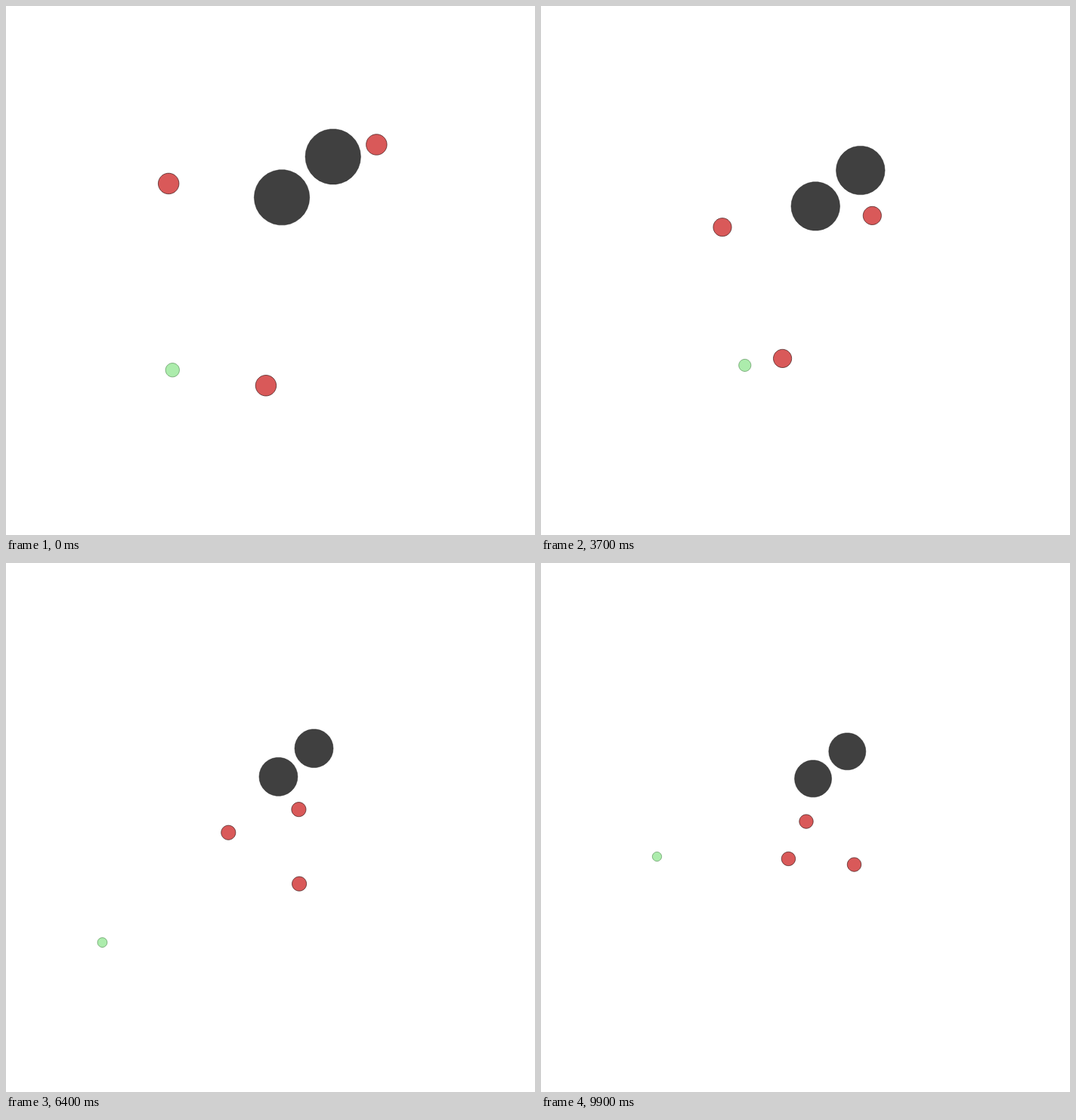
Recreate the animation shown at these times as an HTML page with a canvas. Size 700x700 px, loop 10 s.

```html
<!DOCTYPE html>
<html lang="en">
<head>
<meta charset="utf-8">
<title>Pursuit</title>
<style>
  html, body { margin: 0; width: 100%; height: 100%; overflow: hidden; background: #fff; }
  canvas { display: block; width: 700px; height: 700px; }
</style>
</head>
<body>
<canvas id="stage" width="700" height="700"></canvas>
<script>
const ctx = document.getElementById('stage').getContext('2d');
const STEP = 100, COUNT = 100, HALF = 350;

const RED = { size: 0.075, fill: '#d95959', edge: 'rgba(60,24,24,0.7)' };
const GREEN = { size: 0.05, fill: '#acecac', edge: 'rgba(44,108,44,0.5)' };
const DARK = { size: 0.2, fill: '#404040', edge: 'rgba(32,32,32,0.5)' };

// Steps at which the chasers, and the runner, change course
const CHASE = [0, 15, 28, 46, 56, 73, 88, 99];
const FLEE = [0, 12, 15, 22, 28, 34, 46, 54, 56, 67, 73, 77, 99];

// Turning points in world units, centre (0, 0), y pointing down
const bodies = [
  { look: DARK, at: [0], turns: [[0.082, -0.527]] },
  { look: DARK, at: [0], turns: [[0.451, -0.821]] },
  { look: RED, at: CHASE, turns: [
    [0.765, -0.908], [0.719, -0.601], [0.635, -0.502], [0.424, -0.387],
    [0.159, -0.207], [0.454, -0.179], [0.36, -0.255], [0.008, -0.065]] },
  { look: RED, at: CHASE, turns: [
    [-0.735, -0.627], [-0.954, -0.273], [-0.626, -0.458], [-0.737, -0.18],
    [-0.369, -0.011], [-0.518, 0.112], [-0.36, 0.23], [-0.184, 0.338]] },
  { look: RED, at: CHASE, turns: [
    [-0.033, 0.83], [0.019, 0.638], [-0.105, 0.66], [-0.235, 0.771],
    [0.155, 0.624], [0.438, 0.546], [0.765, 0.42], [0.526, 0.4]] },
  { look: GREEN, at: FLEE, turns: [
    [-0.707, 0.718], [-1.169, 0.865], [-1.137, 0.929], [-0.875, 1.045],
    [-0.57, 0.877], [-0.45, 0.78], [-0.948, 0.774], [-1.583, 1.14],
    [-1.55, 1.148], [-1.789, 1.2], [-1.765, 0.669], [-1.855, 0.57],
    [-1.603, 0.314]] }
];

// Speed at a turn: harmonic mean of the neighbouring legs, zero where it reverses
function speed(at, v, i) {
  const leg = k => (v[k + 1] - v[k]) / (at[k + 1] - at[k]);
  if (i === 0) return leg(0);
  if (i === at.length - 1) return leg(i - 1);
  const a = leg(i - 1), b = leg(i);
  return a * b <= 0 ? 0 : 2 * a * b / (a + b);
}

function glide(at, v, n) {
  if (at.length === 1) return v[0];
  let i = 0;
  while (i < at.length - 2 && n >= at[i + 1]) i++;
  const span = at[i + 1] - at[i], u = (n - at[i]) / span, w = 1 - u;
  return w * w * (1 + 2 * u) * v[i] + u * w * w * span * speed(at, v, i)
    + u * u * (3 - 2 * u) * v[i + 1] - u * u * w * span * speed(at, v, i + 1);
}

// The view widens to hold the farthest position reached so far
let reach = 0;
const steps = Array.from({ length: COUNT }, (_, n) => {
  const spots = bodies.map(({ at, turns }) =>
    [0, 1].map(axis => glide(at, turns.map(p => p[axis]), n)));
  reach = Math.max(reach, ...spots.flat().map(Math.abs));
  return { spots, scale: HALF / (1 + reach) };
});

function disc(x, y, r, look) {
  ctx.beginPath();
  for (let i = 0; i < 30; i++) {
    const a = i * Math.PI / 15;
    ctx.lineTo(x + r * Math.cos(a), y + r * Math.sin(a));
  }
  ctx.closePath();
  ctx.fillStyle = look.fill;
  ctx.fill();
  ctx.strokeStyle = look.edge;
  ctx.lineWidth = 1;
  ctx.stroke();
}

function draw(now) {
  const { spots, scale } = steps[Math.floor(now / STEP) % COUNT];
  ctx.fillStyle = '#fff';
  ctx.fillRect(0, 0, 2 * HALF, 2 * HALF);
  bodies.forEach(({ look }, i) => {
    const [x, y] = spots[i];
    disc(HALF + x * scale, HALF + y * scale, look.size * scale, look);
  });
}

const start = performance.now();
function tick() {
  draw(performance.now() - start);
  requestAnimationFrame(tick);
}
tick();
</script>
</body>
</html>
```
